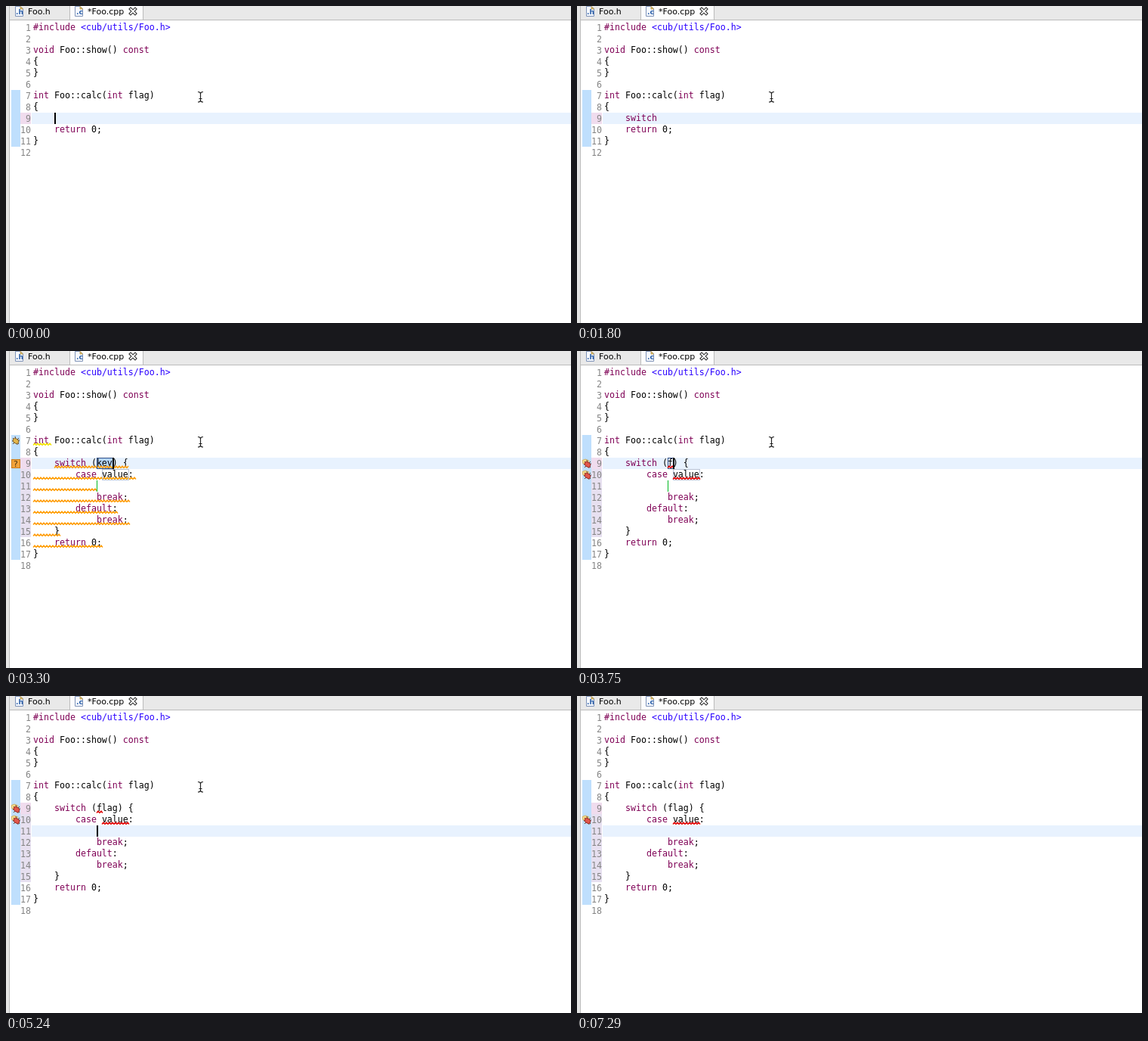
These frames come from a looping animation (748x419 px, 7390 ms). An HTML page:

```html
<!DOCTYPE html>
<html lang="en">
<head>
<meta charset="utf-8">
<title>Code editor</title>
<style>
html, body { margin: 0; width: 100%; height: 100%; overflow: hidden; background: #fff; }
svg { display: block; width: 748px; height: 419px; }
text { white-space: pre; }
.mono { font: 11.627px "DejaVu Sans Mono", "Liberation Mono", monospace; }
.tab { font: 11px "DejaVu Sans", "Noto Sans", sans-serif; }
.num { fill: #858585; text-anchor: end; }
.k { fill: #7f0055; }
.s { fill: #2a00ff; }
.wave { fill: none; stroke-width: 1.4; }
</style>
</head>
<body>
<svg viewBox="0 0 748 419" xmlns="http://www.w3.org/2000/svg">
  <defs>
    <g id="page">
      <path d="M.5 .5H7L10.500 4V13.500H.5Z" fill="#f6f9ff" stroke="#7f93b8"/>
      <path d="M7 .5V4H10.500Z" fill="#e6c46a" stroke="#b39345" stroke-width=".8"/>
    </g>
    <g id="bug">
      <path d="M-4 -4L4 4M-5 0L5 -1M-1 -6L2 5M-4 4L4 -4" stroke="#5a3a2a" fill="none"/>
      <ellipse rx="4.200" ry="3" transform="rotate(35)" stroke-width=".8"/>
    </g>
    <g id="error">
      <path d="M-6 -4.500L-2 -6L3 -4L0 1L-5 0Z" fill="#f4d98a" stroke="#c9a24a" stroke-width=".7"/>
      <use href="#bug" x="1" y="1" fill="#e0584c" stroke="#9c1f1a"/>
    </g>
  </defs>

  <rect width="748" height="419" fill="#fff"/>
  <rect width="748" height="18" fill="#e9e9e9"/>
  <rect width="4" height="419" fill="#e6e6e6"/>
  <rect x="85" width="96" height="18" fill="#fdfdfd"/>
  <path d="M4.500 0V419M84.500 0V18M181.500 0V18M4 18.500H748" stroke="#bcbcbc"/>
  <use href="#page" x="12"/>
  <use href="#page" x="91"/>
  <g class="tab">
    <g fill="#2b5fa8" font-weight="bold" font-size="9"><text x="13" y="11">.h</text><text x="93" y="11">.c</text></g>
    <text x="29" y="11">Foo.h</text>
    <text x="108" y="11">*Foo.cpp</text>
  </g>
  <g fill="none" stroke-linecap="square">
    <path d="M165 4L171 10M171 4L165 10" stroke="#333" stroke-width="4"/>
    <path d="M165 4L171 10M171 4L165 10" stroke="#fff" stroke-width="1.800"/>
  </g>

  <g id="view"></g>

  <g id="mouse" fill="none" stroke="#222" stroke-width="1.200">
    <path d="M254 113.500Q257 113.500 257.500 115.500Q258 113.500 261 113.500M257.500 115V125M254 127Q257 127 257.500 125Q258 127 261 127M255.500 122.500H259.500"/>
  </g>
</svg>
<script>
const LOOP = 7390, CHAR = 7, LEFT = 36, ROW = 15, FIRST = 21;
const view = document.getElementById('view');
const mouse = document.getElementById('mouse');

const rowY = row => FIRST + ROW * (row - 1);
const colX = col => LEFT + CHAR * col;

const HEAD = ['#include <cub/utils/Foo.h>', '', 'void Foo::show() const', '{', '}', '',
  'int Foo::calc(int flag)', '{'];
const TAIL = ['    return 0;', '}', ''];

// Each step changes part of the state and keeps the rest.
const steps = [
  [0, { word: '', arg: null, row: 9, col: 4, caret: 1, mouse: 1, errors: [] }],
  [150, { caret: 0 }],
  [600, { caret: 1 }],
  ...[...'switch'].map((c, i) => [750 + 150 * i, { word: 'switch'.slice(0, i + 1), col: 5 + i }]),
  [1800, { caret: 0 }],
  [2250, { arg: 'key', col: 15, caret: 1, select: 1 }],
  [2400, { warn: 1 }],
  [2550, { hint: 1 }],
  [2700, { linked: 1 }],
  [3000, { caret: 0 }],
  [3300, { caret: 1 }],
  [3450, { arg: 'f', col: 13, select: 0 }],
  [3600, { warn: 0, hint: 0 }],
  [3750, { errors: [9, 10] }],
  [3890, { arg: 'fl', col: 14 }],
  [4040, { arg: 'fla', col: 15 }],
  [4190, { caret: 0 }],
  [4640, { arg: 'flag', col: 16, caret: 1 }],
  [4790, { caret: 0 }],
  [5240, { row: 11, col: 12, caret: 1, linked: 0 }],
  [5390, { errors: [10], caret: 0 }],
  [5840, { caret: 1 }],
  [5990, { mouse: 0 }],
  [6140, { caret: 0 }],
  [6430, { caret: 1 }],
  [7030, { caret: 0 }]
];

const rect = (x, y, w, h, fill) => `<rect x="${x}" y="${y}" width="${w}" height="${h}" fill="${fill}"/>`;
const frame = (x, y, w, h, color) =>
  `<rect x="${x + .5}" y="${y + .5}" width="${w}" height="${h}" fill="none" stroke="${color}"/>`;

function wave(row, from, to, color) {
  const y = rowY(row) + 13.5;
  let d = `M${from} ${y}`;
  for (let x = from + 2, up = 1; x <= to; x += 2, up ^= 1) d += `L${x} ${y - 2.5 * up}`;
  return `<path class="wave" d="${d}" stroke="${color}"/>`;
}

function paint(line) {
  return line.replace(/</g, '&lt;').replace(/>/g, '&gt;')
    .replace(/#include|\b(?:void|const|int|return|switch|case|default|break)\b/g, '<tspan class="k">$&</tspan>')
    .replace(/&lt;.*&gt;/, '<tspan class="s">$&</tspan>');
}

function body(s) {
  if (s.arg === null) return ['    ' + s.word];
  const pad = ' '.repeat(8), stop = pad + '    break;';
  return [`    switch (${s.arg}) {`, pad + 'case value:', '', stop, pad + 'default:', stop, '    }'];
}

function draw(s) {
  const block = body(s), lines = [...HEAD, ...block, ...TAIL];
  let out = rect(34, rowY(s.row), 714, ROW, '#e8f2fe');
  out += rect(7, rowY(7), 12, ROW * (block.length + 4), '#bfdffd');
  block.forEach((_, i) => out += rect(19, rowY(9 + i), 14, ROW, i ? '#e7e0f0' : '#f0dcee'));
  if (s.select) out += rect(colX(12), rowY(9), 21, ROW, '#b5d5fb');

  lines.forEach((line, i) => {
    const y = rowY(i + 1);
    out += `<text class="mono num" x="33" y="${y + 12}">${i + 1}</text>`;
    if (line) out += `<text class="mono" xml:space="preserve" x="${LEFT}" y="${y + 11}">${paint(line)}</text>`;
  });

  if (s.warn) {
    const orange = '#ff9c00';
    out += wave(9, 64, 163, orange);
    [172, 120, 164, 148, 164, 72, 128].forEach((end, i) => out += wave(10 + i, LEFT, end, orange));
    out += rect(7, 143, 12, 12, '#f2a33a') + frame(7, 143, 11, 11, '#c97a1a');
    out += '<text x="13" y="153" text-anchor="middle" font-weight="bold" class="tab" fill="#4a3510">?</text>';
  }
  if (s.hint) {
    out += wave(7, LEFT, 60, '#f2e400');
    out += '<use href="#bug" x="13" y="119" fill="#e3b64c" stroke="#7a5a20"/>';
  }
  if (s.linked) {
    out += frame(colX(12), rowY(9), CHAR * s.arg.length, 14, '#2f4f86');
    out += frame(colX(13), rowY(10), 35, 14, '#b9c3d6');
    out += rect(colX(12), rowY(11), 1, ROW, '#00b820');
  }
  for (const row of s.errors) {
    out += row === 9 ? wave(9, 120, 128, '#e00000') : wave(10, 127, 163, '#e00000');
    out += `<use href="#error" x="13" y="${rowY(row) + 8}"/>`;
  }
  if (s.caret) out += rect(colX(s.col), rowY(s.row), 2, ROW, '#000');
  view.innerHTML = out;
  mouse.style.display = s.mouse ? '' : 'none';
}

const states = [];
steps.reduce((state, [, change]) => {
  const next = { ...state, ...change };
  states.push(next);
  return next;
}, {});

let shown = -1;
const start = performance.now();
function tick() {
  const t = (performance.now() - start) % LOOP;
  let i = steps.length - 1;
  while (steps[i][0] > t) i--;
  if (i !== shown) draw(states[shown = i]);
  requestAnimationFrame(tick);
}
tick();
</script>
</body>
</html>
```
